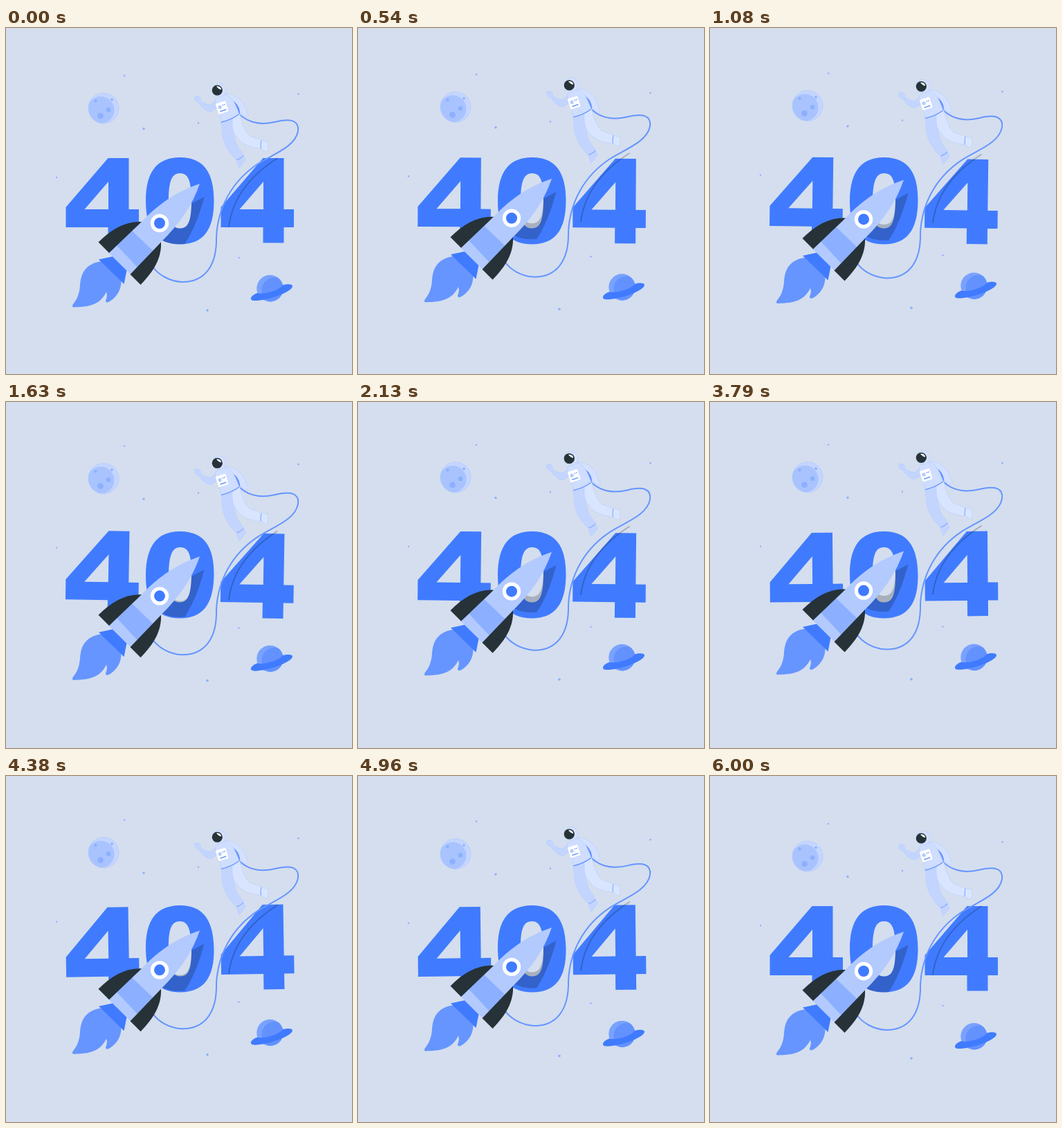
Recreate the animation shown at these times as an HTML page. Size 500 by 500 pixels, loop 6040 ms.

```html
<!DOCTYPE html>
<html lang="en">
<head>
<meta charset="utf-8">
<title>404</title>
<style>
  html, body { margin: 0; width: 100%; height: 100%; overflow: hidden; background: #d4deee; }
  svg { display: block; width: 100vw; height: 100vh; }
</style>
</head>
<body>
<svg viewBox="0 0 500 500" role="img" aria-label="404">
  <defs>
    <path id="four" d="M147.5 188H177.500V262H192V288H177.500V310.500H147.500V288H86.500V259ZM148 222L113.500 262H148Z" fill-rule="evenodd"/>
    <path id="zero" fill-rule="evenodd" clip-rule="evenodd" d="M251.500 187C285 187 300.500 208 300.500 250S285 312.500 251.500 312.500 202 292 202 250 218 187 251.500 187ZM251.500 210C240 210 235 220 235 250S240 289.500 251.500 289.500 268 280 268 250 263 210 251.500 210Z"/>
    <clipPath id="zeroClip"><use href="#zero"/></clipPath>
    <clipPath id="moonClip"><circle cx="141" cy="116" r="22"/></clipPath>
    <clipPath id="planetClip"><circle cx="381.500" cy="376.300" r="19.200"/></clipPath>
  </defs>

  <g id="sky">
    <g id="stars" fill="#8cb0ff"></g>

    <circle cx="141" cy="116" r="22" fill="#c4d6ff" stroke="#a3bfff" stroke-width=".5"/>
    <circle cx="137" cy="118.500" r="19.500" fill="#a9c3ff" clip-path="url(#moonClip)"/>
    <g fill="#8cb0ff">
      <circle cx="129.500" cy="105.500" r="2.200"/>
      <circle cx="153" cy="103.500" r="1.800"/>
      <circle cx="148" cy="118" r="3.300"/>
      <circle cx="136.500" cy="127" r="4.300"/>
    </g>

    <circle cx="381.500" cy="376.300" r="19.200" fill="#79a2ff"/>
    <circle cx="388" cy="379" r="18.500" fill="#6392ff" clip-path="url(#planetClip)"/>
    <path fill="#407bff" d="M363 383C353 387 351 393 358 394C373 395 412 383 414 373.500C414.500 370 407 369.500 400 371.500C396 378 374 386 363 383Z"/>
  </g>

  <g id="digits" fill="#407bff">
    <use href="#four"/>
    <use href="#zero"/>
    <use href="#four" x="224"/>
  </g>

  <g id="flight">
    <g opacity=".2">
      <path clip-path="url(#zeroClip)" d="M286.500 244L262 257 218 300 222 322 257 314Q275 288 286.500 244Z"/>
      <path fill="none" stroke="#000" stroke-width="2" d="M392.500 188C355 212 327 245 322 287.500"/>
    </g>
    <path fill="none" stroke="#6695ff" stroke-width="2" d="M333 120C345 135 365 142 390 135.500C412 130 424 134 422 149C418 172 386 182 363 197C326 222 306 260 304 302C305 345 286 367 255 367C235 366 220 356 212 345"/>

    <g stroke="#a9c3ff" stroke-width=".4" stroke-linejoin="round">
      <path fill="#d3e0ff" d="M317 95C329 95 339 102 344 111L350 125C350 129 346 130 343 127L328 110Z"/>
      <path fill="#6695ff" stroke="none" d="M327 105C334 108 339 117 338 125L332 127Z"/>
      <path fill="#d9e5ff" d="M318 133L338 124C340 136 345 149 352 156L369 162 376 164 378 163C379 170 379 176 377 179C374 178 370 175 368 174C355 173 342 169 335 160Z"/>
      <path fill="#c3d5ff" d="M311 136L327 130C326 147 330 162 335 172L343 183 346 191C343 195 340 199 337 202.500C335 199 335 195 333 191C324 182 315 170 313 156Z"/>
      <path fill="#c3d5ff" d="M306 104C302 105 299 109 296 111C290 111 285 108 281 105C282 102 280 98 277 99C274 97 271 100 273 103C274 107 277 108 279 108C283 115 290 121 296 121C301 119 304 116 306 114Z"/>
      <path fill="#cfddff" d="M302 104C306 99 313 96 319 97C328 101 332 111 337 124C330 131 320 135 311 136C310 124 303 114 302 104Z"/>
      <circle cx="308" cy="89.500" r="9.800" fill="#d3e0ff"/>
    </g>
    <ellipse cx="305.300" cy="90" rx="7.600" ry="7.500" fill="#263238"/>
    <path fill="#fff" d="M304 84.500C308 83.500 311 86 311 89C309 89 306 87 304 84.500Z"/>
    <g fill="none" stroke="#6695ff" stroke-width="1.300">
      <path d="M311 136Q325 133 337 124.500"/>
      <path d="M333.500 190.500Q339 189 343 184.500M369 162.500Q367.500 168 368.500 174" stroke="#8cb0ff"/>
    </g>
    <g transform="translate(312.200 115) rotate(-18)">
      <rect x="-7.500" y="-8" width="15" height="16" rx="1" fill="#fff"/>
      <circle cx="-2.800" cy="-1.500" r="2.600" fill="#b3caff"/>
      <path d="M1.500 -3H3M4 -3H5.500M-4.500 4.500H5" stroke="#6695ff" stroke-width="1.500"/>
    </g>

    <path fill="#6695ff" d="M138 337C112 341 108 358 107 372C106 387 101 394 97 399C95 402 96 404 99 403.500C120 403 136 400 145 381.500C147 386 145 391 144 394C144 397 147 397 150 395C160 389 167 378 166.500 364Z"/>
    <path fill="#407bff" d="M134 334.500L155 330 174.500 350 170.500 370Z"/>
    <path fill="#b3caff" d="M148 324.500L196 280C222 253 247 236 280 225C269 257 251 283 224 309.500L180 356Z"/>
    <path fill="#8cb0ff" d="M160 314L182 293 212.500 322 190 346Z"/>
    <g fill="#263238">
      <path d="M133.500 309.500C153 290 173 279 196 280L149 325Z"/>
      <path d="M224 309.500C225 332 214 351 194.500 371L179.500 356Z"/>
    </g>
    <circle cx="222" cy="282" r="13.200" fill="#fff"/>
    <circle cx="222" cy="282" r="8" fill="#407bff"/>
  </g>
</svg>
<script>
  const LOOP = 6040, CYCLE = 6000, FPS = 24;
  const byId = id => document.getElementById(id);
  const sky = byId('sky'), digits = byId('digits'), flight = byId('flight');

  const stars = [[171, 69, 1.2], [422.5, 95.5, 1.3], [199, 145.5, 1.7], [278, 137, 1.2],
                 [73, 216, 1.2], [336.5, 332, 1.2], [291, 408, 1.8]];
  byId('stars').innerHTML = stars.map(([x, y, r]) => `<circle cx="${x}" cy="${y}" r="${r}"/>`).join('');

  // Linear rise of 10 px and back within one period
  const floating = (t, period) => -10 * (1 - Math.abs(1 - 2 * (t % period) / period));
  // Linear sway 0, 1, -1, 0 degrees
  const sway = t => Math.asin(Math.sin(2 * Math.PI * t / CYCLE)) * 2 / Math.PI;

  function draw(ms) {
    const t = Math.floor((ms % LOOP + 4) * FPS / 1000) * 1000 / FPS;
    sky.setAttribute('transform', `translate(0 ${floating(t, CYCLE)})`);
    flight.setAttribute('transform', `translate(0 ${floating(t, CYCLE / 4)})`);
    digits.setAttribute('transform', `rotate(${sway(t)} 251.25 249.5)`);
  }

  const start = performance.now();
  function tick() {
    draw(performance.now() - start);
    requestAnimationFrame(tick);
  }
  tick();
</script>
</body>
</html>
```
